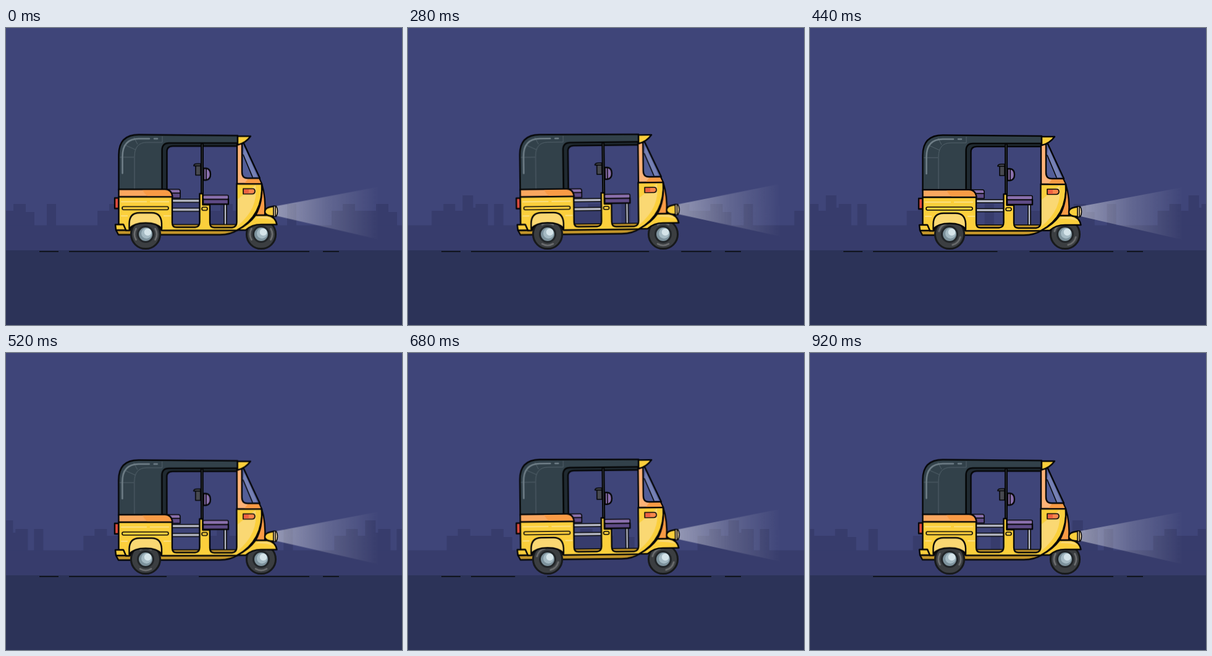
An HTML page without scripts for the animation above (0.96 s loop, 641x481 px).

```html
<!DOCTYPE html>
<html lang="en">
<head>
<meta charset="utf-8">
<title>Night rickshaw</title>
<style>
  html, body { margin: 0; width: 100%; height: 100%; overflow: hidden; background: #3f4579; }
  svg { display: block; width: 641px; height: 481px; }

  .skyline { fill: #373c6c; animation: skyline 960ms steps(24) -8ms infinite; }
  .gap { fill: #2c3358; animation: gap 960ms steps(24) -8ms infinite; }
  .spin { animation: spin 960ms steps(24) -8ms infinite; }
  .bob { transform-origin: 226px 334px; animation: bob 960ms ease-in-out infinite; }
  @keyframes skyline { to { transform: translateX(-376px); } }
  @keyframes gap { from { transform: translateX(542px); } to { transform: translateX(21.5px); } }
  @keyframes spin { from { transform: rotate(-135deg); } to { transform: rotate(945deg); } }
  @keyframes bob {
    0%, 100% { transform: translateY(.3px) rotate(0deg); }
    27% { transform: translateY(0) rotate(-.7deg); }
    47% { transform: translateY(1px) rotate(0deg); }
    73% { transform: translateY(0) rotate(-.65deg); }
  }

  .ink { stroke: #050607; stroke-width: 2.4; stroke-linejoin: round; stroke-linecap: round; }
  .thin { stroke-width: 1.6; }
  .line { fill: none; }
  .yellow { fill: #fbcf3c; }
  .pale { fill: #fad873; }
  .gold { fill: #c4962a; }
  .peach { fill: #fdb377; }
  .amber { fill: #faa860; }
  .orange { fill: #f99b45; }
  .canvas { fill: #32414a; }
  .lining { fill: #202a31; }
  .lilac { fill: #8b70ad; }
  .violet { fill: #5f4b86; }
  .steel { fill: #b9bcc9; }
</style>
</head>
<body>
<svg viewBox="0 0 641 481">
  <defs>
    <path id="blockA" d="M0 320V296H19V285H38V296H50V271H67V291H71V285H91V320ZM101 320V285H116V320Z"/>
    <path id="blockB" d="M0 320V296H18V285H38V296H72V285H92V298H106V320ZM126 320V285H141V320Z"/>
    <linearGradient id="glow" gradientUnits="userSpaceOnUse" x1="438" x2="603" y1="0" y2="0">
      <stop stop-color="#fff" stop-opacity=".44"/>
      <stop offset=".5" stop-color="#fff" stop-opacity=".18"/>
      <stop offset="1" stop-color="#fff" stop-opacity="0"/>
    </linearGradient>
    <g id="wheel">
      <circle r="23.6" fill="#3b3e41" stroke="#17191b" stroke-width="3"/>
      <g class="spin" fill="none" stroke="#6a6c6e" stroke-width="2.6" stroke-linecap="round">
        <path d="M-9 -15.5A18 18 0 0 1 9 -15.5M-9 15.5A18 18 0 0 0 9 15.5"/>
      </g>
      <circle r="12.5" fill="#7d929c" stroke="#222629" stroke-width="3"/>
      <circle cx="1.5" cy="-1.5" r="8.5" fill="#a5bac3"/>
      <circle cx="3.5" cy="-3.5" r="5.8" fill="#d5e4e9"/>
    </g>
  </defs>

  <rect width="641" height="481" fill="#3f4579"/>
  <g class="skyline">
    <use href="#blockB" x="-60"/>
    <use href="#blockA" x="148"/>
    <use href="#blockB" x="329"/>
    <use href="#blockB" x="527"/>
    <use href="#blockA" x="735"/>
    <use href="#blockB" x="916"/>
  </g>
  <rect y="319.500" width="641" height="41" fill="#373c6c"/>
  <rect y="360" width="641" height="121" fill="#2c3358"/>

  <path d="M54 362H85M102 362H491M513 362H539" stroke="#11151f" stroke-width="2"/>
  <rect class="gap" y="360.5" width="52" height="3"/>

  <g class="bob">
    <path d="M438 288L603 257V342L438 304Z" fill="url(#glow)"/>
    <path class="gold ink" d="M178 327L182 334.500H346Q364 334.500 376 326Z"/>
  </g>

  <use href="#wheel" x="226" y="334"/>
  <use href="#wheel" x="413" y="334"/>

  <g class="bob">
    <!-- seats and rails -->
    <g class="ink thin">
      <path class="steel" d="M268 277H314V282H268ZM268 291.500H314V296.500H268Z"/>
      <path class="steel" d="M353 285H357V319H353Z"/>
      <path class="violet" d="M262 267H282V275H262Z"/>
      <path class="lilac" d="M262 261H279Q282 261 282 264V267H262Z"/>
      <path class="gold" d="M270 318H314V324H270ZM330 318H374V324H330Z"/>
    </g>

    <!-- canopy -->
    <path class="lining ink" d="M252.500 262V185H375V191H270Q260.500 191 260.500 200V262Z"/>
    <path class="canvas ink" d="M182.500 262V205Q182.500 172.500 215 172.500L375 174V186H264Q252.500 186 252.500 198V262Z"/>
    <path class="line" stroke="#52616a" d="M184 209H207M208 260V208Q208 185 228 185H253V175M192 189L210 197M207 177L213 188"/>
    <path class="line" stroke="#6f7e87" stroke-width="2.600" stroke-linecap="round" d="M188.500 235V208Q188.500 179 215 179H232M240 179H245"/>

    <!-- pole and mirror -->
    <path d="M317.500 187V270" stroke="#050607" stroke-width="5"/>
    <path d="M317.500 188V269" stroke="#353b42"/>
    <path class="ink thin" fill="#474950" d="M304 222Q305 219.500 309 219.500H315V223H304ZM307 223H315V238H307Z"/>
    <path class="lilac ink" d="M320 227H324Q331 228 331 236.500T324 246H320Z"/>
    <path class="line ink thin" d="M324 228V245"/>

    <!-- rear body, sill and front panel -->
    <path class="ink" fill="#dd4b3e" d="M176 275H182.500V292H176Z"/>
    <path class="yellow ink" d="M182.500 273H269V315Q269 322.500 276 322.500H306Q313.500 322 313.500 314V268H318.500V286H330V315Q330 323 337 323H366Q373.500 322 373.500 314V252H414Q417 303 374 327.500H252Q246 314 226 314T200 327.500H194L190 318H182.500Z"/>
    <path class="pale" d="M375 320V277L404 254Q409 292 375 320Z"/>
    <path class="line" stroke="#fbe391" stroke-width="1.500" d="M186 281H228M233 281H264M186 304H197M255 304H267"/>
    <path class="amber ink" d="M182.500 261H257Q268 261 269.500 273H182.500Z"/>
    <path class="orange" d="M221 262.200H257Q266 262.200 268 271.800H229Q224 268 221 262.200Z"/>
    <rect class="yellow ink thin" x="188" y="289" width="75" height="5" rx="2.500"/>
    <path class="pale ink" d="M199.500 325V316Q200 299 216 299H236Q251 299 252 316V325Q245 315.500 226 315.500T199.500 325Z"/>
    <path class="yellow ink" d="M177 318H190L194 327H178Z"/>
    <rect class="yellow ink thin" x="317" y="290" width="9" height="5" rx="2.500"/>

    <!-- driver seat -->
    <path class="violet ink" d="M319 277H360V285H319Z"/>
    <rect class="lilac ink thin" x="319" y="270.500" width="41" height="6.500" rx="2"/>

    <!-- windscreen and visor -->
    <path class="peach ink" d="M374 187H385L414 252H374Z"/>
    <path class="orange" d="M392 244H409L412.500 251H386Z"/>
    <path class="ink" fill="#535e98" d="M384.500 186L411 243H391Q382 243 382 233V187Z"/>
    <path d="M386 193L394 211L407 241H399L384 205Z" fill="#7580b4"/>
    <path class="line ink thin" d="M384 205L399 241"/>
    <path class="yellow ink" d="M375 175H396Q388 186 375 189Z"/>
    <path class="ink thin" fill="#f9874c" d="M384 260H399Q403 260 403 264T399 268.500H384Z"/>
    <path d="M385 261H393V267.500H385Z" fill="#ee6242"/>

    <!-- nose, mudguard and lamp -->
    <path class="orange ink" d="M414 252Q421 274 419 303H404Q416 282 414 252Z"/>
    <path class="yellow ink" d="M404 303H423Q436 305 438.500 318H416Q399 317 388 327H374Q393 318 404 303Z"/>
    <path class="pale" d="M408 305H421Q429 306 433 311Q418 307 404 308Z"/>
    <path class="yellow ink" d="M434 288.500Q419 290 419 297T434 304.500Z"/>
    <path class="ink thin" fill="#fce2ad" d="M433 288H437Q439.500 291 439.500 296.500T437 305H433Z"/>
    <path class="line ink thin" d="M436 289V304"/>
  </g>
</svg>
</body>
</html>
```
